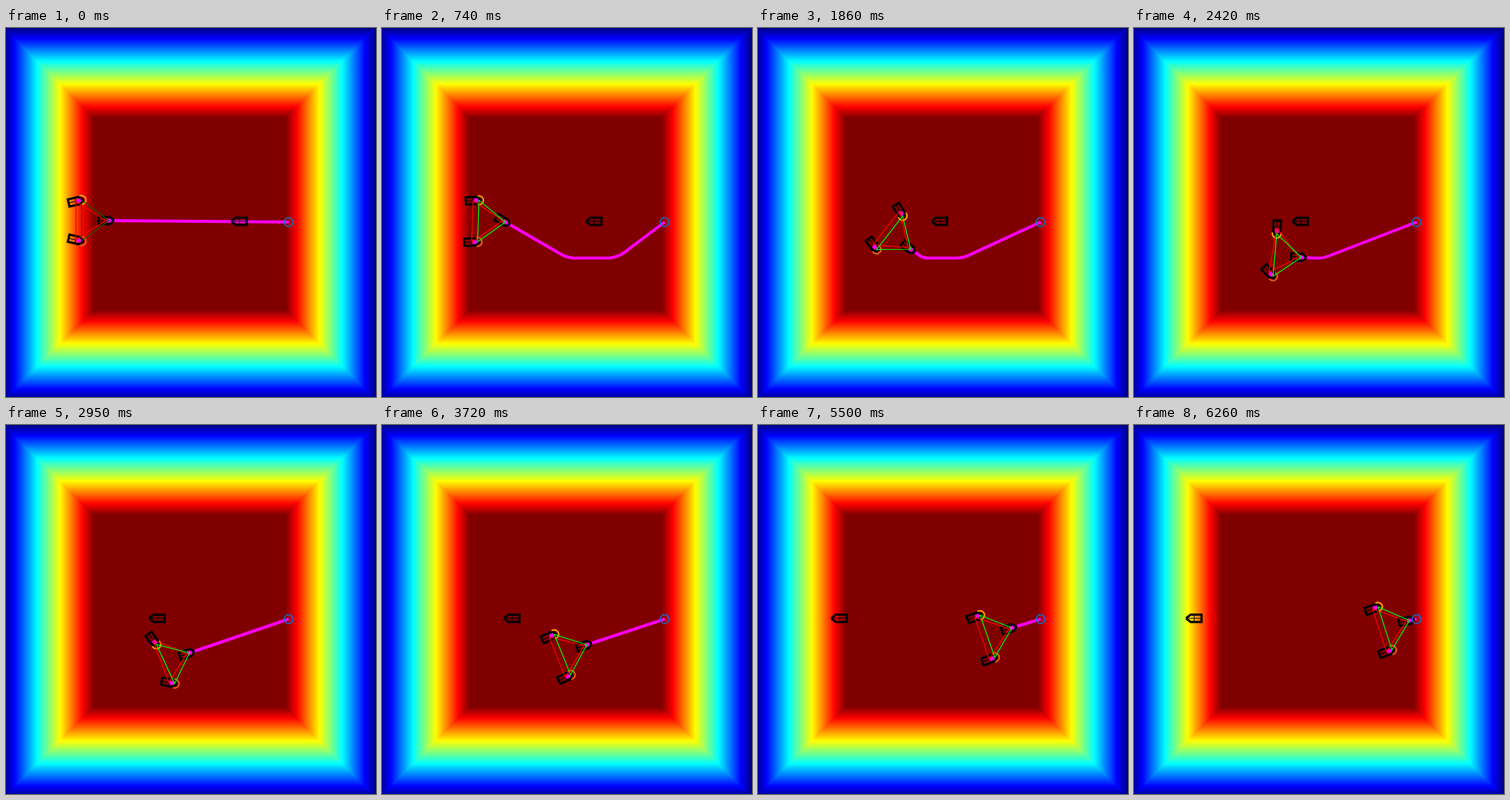
An HTML page with a canvas for the animation above (6.38 s loop, 504 px wide and 502 px high).

```html
<!DOCTYPE html>
<html lang="en">
<head>
<meta charset="utf-8">
<title>Formation control</title>
<style>
html, body { margin: 0; width: 100%; height: 100%; overflow: hidden; }
canvas { display: block; }
</style>
</head>
<body>
<canvas id="stage" width="504" height="502"></canvas>
<script>
const W = 504, H = 502, LOOP = 6380, STEP = 110, STEPS = 58;
const ctx = document.getElementById('stage').getContext('2d');
const GOAL = { x: 385, y: 264 };
const DETOUR_Y = 313, DETOUR_STEP = 7;
const ARM = 46.5, ROPE = 8;
const RAD = Math.PI / 180;

// Leader course: step, x, y, formation angle
const COURSE = [
  [0, 140, 262, 0], [7, 168, 264, 2], [12, 188, 274, 38], [17, 208, 301, 38],
  [22, 228, 312, 5], [27, 250, 310, -25], [34, 279, 299, -22], [57, 375, 266, -18]
];

function slope(i, j) {
  const a = COURSE[Math.max(0, i - 1)];
  const b = COURSE[Math.min(COURSE.length - 1, i + 1)];
  return (b[j] - a[j]) / (b[0] - a[0]);
}

// Smooth curve through the course points
function courseAt(step) {
  let i = 0;
  while (i < COURSE.length - 2 && step >= COURSE[i + 1][0]) i++;
  const a = COURSE[i], b = COURSE[i + 1], span = b[0] - a[0];
  const u = (step - a[0]) / span, ease = u * u * (3 - 2 * u);
  return [1, 2, 3].map(j =>
    a[j] + (b[j] - a[j]) * ease
    + span * u * (1 - u) * ((1 - u) * slope(i, j) - u * slope(i + 1, j)));
}

const ahead = (p, angle, d) => ({
  x: p.x + d * Math.cos(angle * RAD),
  y: p.y + d * Math.sin(angle * RAD),
  angle
});
const bearing = (a, b) => Math.atan2(b.y - a.y, b.x - a.x) / RAD;

// Corners of the way around the obstacle, then the goal
function routeFrom(head, obstacle, step) {
  const left = Math.max(obstacle.x - 36, head.x + 17), right = obstacle.x + 31;
  const corners = [];
  if (step >= DETOUR_STEP && right > head.x + 4) {
    if (left < right) corners.push({ x: left, y: DETOUR_Y });
    corners.push({ x: right, y: DETOUR_Y });
  }
  return [...corners, GOAL];
}

// A follower is pulled towards its slot as if on a rope
function follow(robot, slot) {
  const gap = Math.hypot(slot.x - robot.x, slot.y - robot.y);
  return gap > ROPE ? ahead(robot, bearing(robot, slot), gap - ROPE) : robot;
}

function simulate() {
  const poses = [];
  let a, b;
  for (let step = 0; step < STEPS; step++) {
    const [x, y, turn] = courseAt(step);
    const head = { x, y };
    const obstacle = { x: 318 - 4.14 * step, y: 263, angle: 180 };
    const route = routeFrom(head, obstacle, step);
    const spread = 37 + 0.08 * step;
    const slotA = ahead(head, turn + 180 + spread, ARM);
    const slotB = ahead(head, turn + 180 - spread, ARM);
    const angle = bearing(head, route[0]);
    const leader = { ...ahead(head, angle, -4), angle };
    a = follow(a || ahead(slotA, -13, -ROPE), slotA);
    b = follow(b || ahead(slotB, 13, -ROPE), slotB);
    poses.push({ step, head, leader, obstacle, route, slotA, slotB, a, b });
  }
  return poses;
}

function makeField() {
  const field = document.createElement('canvas');
  field.width = W;
  field.height = H;
  const g = field.getContext('2d');
  const img = g.createImageData(W, H);
  const ramp = (v, mid) => 255 * Math.max(0, Math.min(1, 1.5 - Math.abs(4 * v - mid)));
  for (let y = 0, p = 0; y < H; y++) {
    for (let x = 0; x < W; x++, p += 4) {
      const d = Math.min(x, 499.5 - x, y - 3, 502 - y);
      const v = Math.min(1, 0.035 + 0.965 * d / 119);
      img.data[p] = ramp(v, 3);
      img.data[p + 1] = ramp(v, 2);
      img.data[p + 2] = ramp(v, 1);
      img.data[p + 3] = 255;
    }
  }
  g.putImageData(img, 0, 0);
  return field;
}

function hull(r) {
  const path = new Path2D();
  const shape = new Path2D('M-10 -5H5L10 -1V1L5 5H-10Z');
  path.addPath(shape, new DOMMatrix().translate(r.x, r.y).rotate(r.angle));
  return path;
}

function stroke(color, width, path) {
  ctx.strokeStyle = color;
  ctx.lineWidth = width;
  ctx.stroke(path);
}

function polygon(points) {
  const path = new Path2D();
  points.forEach(p => path.lineTo(p.x, p.y));
  path.closePath();
  return path;
}

function circle(p, radius) {
  const path = new Path2D();
  path.arc(p.x, p.y, radius, 0, 2 * Math.PI);
  return path;
}

function drawRing(p, color, robot) {
  ctx.save();
  const outside = new Path2D();
  outside.rect(0, 0, W, H);
  outside.addPath(hull(robot));
  ctx.clip(outside, 'evenodd');
  stroke(color, 2, circle(p, 6));
  ctx.restore();
}

function drawRobot(r, marked) {
  stroke('#000', 3, hull(r));
  ctx.save();
  ctx.translate(r.x, r.y);
  ctx.rotate(r.angle * RAD);
  stroke('#000', 1, new Path2D('M-9 0H8M0 -5V5'));
  if (marked) {
    ctx.fillStyle = '#f0f';
    ctx.fillRect(1, -2.5, 6, 5);
  }
  ctx.restore();
}

function drawRoute(head, route) {
  const path = new Path2D();
  path.moveTo(head.x, head.y);
  route.slice(0, -1).forEach((p, i) => {
    const q = route[i + 1];
    const room = Math.min(Math.hypot(q.x - p.x, q.y - p.y), 40);
    path.arcTo(p.x, p.y, q.x, q.y, Math.min(room, p.x - head.x));
  });
  path.lineTo(GOAL.x, GOAL.y);
  stroke('#f0f', 4, path);
}

function draw({ step, head, leader, obstacle, route, slotA, slotB, a, b }) {
  ctx.drawImage(field, 0, 0);
  drawRoute(head, route);
  drawRing(slotA, '#ffa500', a);
  drawRing(slotB, '#e06414', b);
  drawRobot(obstacle, false);
  [leader, a, b].forEach(r => drawRobot(r, true));
  stroke('#f00', 1.2, polygon([leader, a, b]));
  stroke(step ? '#0f0' : '#1c5a00', 1.2, polygon([head, slotA, slotB]));
  stroke('#1070d0', 1.6, circle(GOAL, 6));
}

const field = makeField();
const poses = simulate();
const begin = performance.now();

function tick() {
  const t = (performance.now() - begin) % LOOP;
  draw(poses[Math.min(STEPS - 1, Math.floor(t / STEP + 0.3))]);
  requestAnimationFrame(tick);
}
tick();
</script>
</body>
</html>
```
